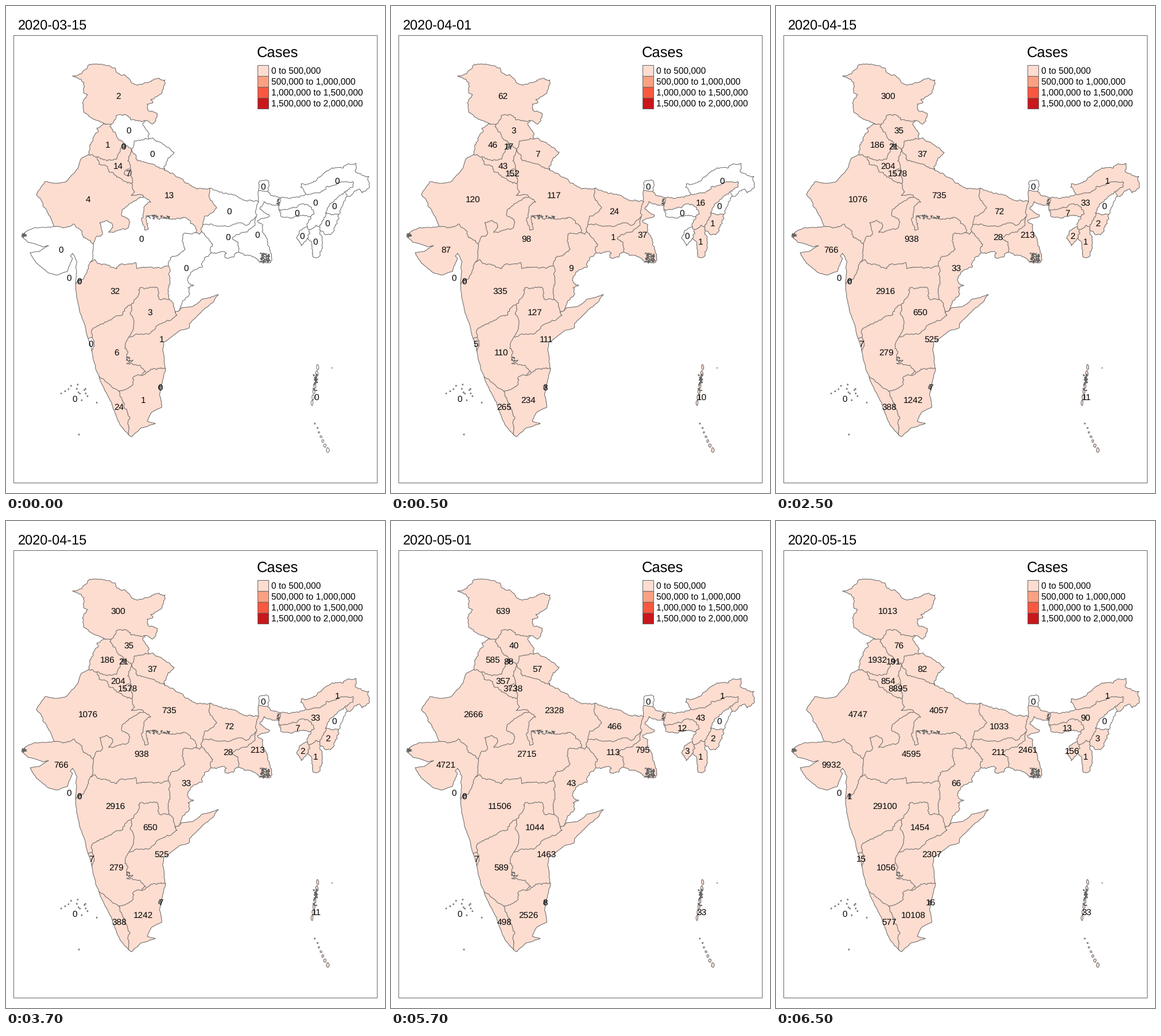
These frames come from a looping animation (660 px wide and 849 px high, 8000 ms). A matplotlib script:

```python
import numpy as np
import matplotlib.pyplot as plt
from matplotlib.animation import FuncAnimation
from matplotlib.collections import LineCollection
from matplotlib.patches import Polygon, Rectangle

W, H, DPI = 660, 849, 64
PX = 72 / DPI  # points per pixel
LINE = "#646464"
REDS = ["#fdddd0", "#fca082", "#f9583f", "#c9171c"]
DATES = ["2020-03-15", "2020-04-01", "2020-04-15", "2020-05-01", "2020-05-15"]
BIN = 500_000

plt.rcParams.update({"font.family": "Liberation Sans", "path.snap": False,
                     "text.hinting": "none"})
rng = np.random.default_rng(7)
arcs, blobs, specks, states = [], [], [], {}


def roughen(a, b, amp):
    """Split a segment by displaced midpoints until the pieces are short."""
    dx, dy = b - a
    length = np.hypot(dx, dy)
    if length < 3:
        return [a]
    shift = np.clip(rng.normal(0, amp), -2 * amp, 2 * amp) / np.sqrt(length)
    mid = (a + b) / 2 + shift * np.array([-dy, dx])
    return roughen(a, mid, amp) + roughen(mid, b, amp)


def arc(owners, *xy, amp=0.33):
    """Border through key points, shared by the named regions."""
    pts = np.array(xy, float).reshape(-1, 2)
    line = [p for a, b in zip(pts, pts[1:]) for p in roughen(a, b, amp)]
    arcs.append((owners.split(), np.array(line + [pts[-1]])))


def coast(owner, *xy):
    arc(owner, *xy, amp=0.13)


def blob(code, x, y, w, h):
    a = np.linspace(0, 2 * np.pi, 10)[:-1]
    r = rng.uniform(0.75, 1.2, 9) / 2
    blobs.append((code, np.c_[x + w * r * np.cos(a), y + h * r * np.sin(a)]))


def scribble(x, y, w, h, count):
    for c in rng.uniform((x, y), (x + w, y + h), (count, 2)):
        specks.append(c + rng.uniform(-1.7, 1.7, (6, 2)))


def state(code, x, y, *counts):
    states[code] = (x, y, counts)


def ring(code):
    """Chain all arcs of a region into one closed outline."""
    parts = [p for owners, p in arcs if code in owners]
    loop = parts.pop(0)
    while parts:
        both_ends = np.array([(p[0], p[-1]) for p in parts])
        gaps = np.linalg.norm(both_ends - loop[-1], axis=2)
        i, flip = np.unravel_index(gaps.argmin(), gaps.shape)
        part = parts.pop(i)
        loop = np.vstack([loop, part[::-1] if flip else part])
    return loop


# North
arc("JK", 174, 206, 147, 194, 139, 187, 135, 166, 142, 155, 135, 151, 136, 134,
    116, 122, 132, 118, 144, 103, 160, 101, 190, 108, 194, 117, 212, 125,
    229, 138, 260, 127, 277, 129, 272, 151, 252, 163, 256, 168, 246, 171, 250, 184,
    263, 187, 261, 200, 255, 206, 243, 200)
arc("JK HP", 243, 200, 218, 199, 205, 189, 192, 191, 183, 206)
arc("JK PB", 183, 206, 174, 206)
arc("HP PB", 183, 206, 181, 210, 195, 231, 205, 240)
arc("HP HR", 205, 240, 219, 251)
arc("HP", 243, 200, 238, 205, 246, 217, 249, 232)
arc("HP UK", 219, 251, 224, 235, 249, 232)
arc("UK", 249, 232, 256, 230, 267, 237, 293, 255, 275, 281, 277, 287)
arc("UK UP", 277, 287, 252, 275, 230, 270, 226, 259, 219, 251)
arc("PB", 174, 206, 158, 213, 160, 220, 146, 242, 144, 259)
arc("PB RJ", 144, 259, 158, 263)
arc("PB HR", 158, 263, 176, 270, 193, 267, 199, 254, 205, 240)
arc("HR RJ", 158, 263, 162, 276, 177, 280, 179, 289, 198, 300, 212, 309, 219, 309)
arc("HR UP", 219, 251, 212, 270, 217, 286, 219, 309)
arc("RJ", 144, 259, 133, 264, 125, 283, 104, 306, 90, 309, 68, 306, 53, 328,
    61, 338, 64, 348, 76, 366, 84, 384, amp=0.2)
arc("RJ UP", 219, 309, 224, 324, 218, 330, 240, 333)
arc("RJ MP", 152, 415, 156, 404, 168, 397, 163, 378, 176, 374, 186, 382, 179, 395,
    209, 389, 214, 372, 201, 364, 202, 356, 219, 343, 240, 333)
arc("RJ GJ", 84, 384, 117, 380, 130, 391, 134, 400, 152, 415)
arc("UP MP", 240, 333, 252, 342, 236, 373, 242, 391, 248, 388, 244, 366, 290, 371,
    313, 369, 330, 385, 331, 394, amp=0.4)
arc("UP", 277, 287, 313, 309, 331, 318, 356, 317)
arc("UP BR", 356, 317, 354, 327, 367, 352, 349, 366, 343, 381)
arc("UP JH", 343, 381, 341, 393)
arc("UP CG", 341, 393, 337, 398, 331, 394)

# East
arc("BR", 356, 317, 386, 327, 411, 337, 440, 341)
arc("BR WB", 440, 341, 435, 362, 436, 367)
arc("BR JH", 436, 367, 420, 382, 411, 378, 389, 384, 343, 381)
arc("JH WB", 436, 367, 431, 384, 394, 406, 404, 413, 405, 429)
arc("JH", 405, 429, 396, 438, 381, 438, 384, 431, 357, 430)
arc("JH CG", 341, 393, 360, 415, 357, 430)
arc("WB", 440, 341, 440, 322)
arc("WB SK", 440, 322, 456, 323)
arc("SK", 440, 322, 441, 306, 455, 304, 456, 323)
arc("WB", 456, 323, 460, 328, 477, 334)
arc("WB AS", 477, 334, 476, 348)
arc("WB", 476, 348, 449, 341, 442, 354, 459, 366, 438, 374, 447, 381, 446, 393,
    455, 408, 460, 428, 461, 447, 441, 447, 431, 437, 417, 435, 405, 429)

# North-east
arc("AS", 477, 334, 508, 333, 522, 328)
arc("AS AR", 522, 328, 556, 320, 560, 314, 585, 306, 604, 306, 604, 316, 590, 324)
arc("AS NL", 590, 324, 563, 346, 556, 361)
arc("AS MN", 556, 361, 546, 385)
arc("AS MZ", 546, 385, 540, 382, 528, 390)
arc("AS TR", 528, 390, 525, 385)
arc("AS", 525, 385, 530, 367)
arc("AS ML", 530, 367, 537, 362, 530, 350, 511, 346, 502, 351, 475, 355)
arc("AS", 475, 355, 476, 348)
arc("ML", 475, 355, 479, 367, 499, 370, 530, 367)
arc("TR MZ", 528, 390, 526, 404)
arc("TR", 526, 404, 514, 418, 506, 404, 512, 391, 525, 385)
arc("MZ", 526, 404, 531, 410, 535, 438, 545, 437, 550, 405, 547, 391)
arc("MZ MN", 547, 391, 546, 385)
arc("MN", 547, 391, 565, 399, 579, 372, 579, 364)
arc("MN NL", 579, 364, 556, 361)
arc("NL", 579, 364, 594, 332)
arc("NL AR", 594, 332, 590, 324)
arc("AR", 594, 332, 616, 319, 620, 326, 633, 316, 632, 297, 608, 289, 610, 275,
    596, 275, 588, 282, 568, 282, 547, 298, 532, 308, 514, 310, 513, 316, 522, 328)

# Centre and west
arc("MP CG", 331, 394, 308, 398, 312, 424, 290, 436, 283, 453)
arc("CG", 357, 430, 342, 447, 342, 455, 322, 464, 316, 476, 319, 484, 327, 487,
    317, 491, 319, 503, 307, 517, 300, 532)
arc("CG AP", 300, 532, 294, 534)
arc("CG TG", 294, 534, 284, 511)
arc("CG MH", 283, 453, 286, 484, 284, 511)
arc("MP MH", 147, 446, 155, 442, 165, 450, 193, 458, 197, 451, 226, 447, 228, 458,
    253, 455, 283, 453)
arc("MP GJ", 152, 415, 151, 431, 147, 446)
arc("GJ MH", 147, 446, 141, 464, 136, 474, 121, 485)
coast("GJ", 84, 384, 48, 387, 34, 394, 27, 401, 38, 412, 64, 420, 74, 418, 58, 428,
      42, 430, 52, 447, 74, 465, 90, 469, 107, 463, 116, 441, 112, 436, 116, 431,
      123, 444, 121, 485)

# South
coast("MH", 121, 485, 123, 508, 129, 535, 143, 580)
arc("MH GA", 143, 580, 150, 577)
arc("GA KA", 150, 577, 154, 592, 150, 602)
coast("GA", 143, 580, 150, 602)
arc("MH KA", 150, 577, 151, 563, 175, 551, 194, 540, 203, 539, 213, 522, 218, 521)
arc("MH TG", 218, 521, 229, 507, 233, 491, 262, 490, 267, 511, 284, 511)
arc("KA TG", 218, 521, 220, 567, 214, 577)
arc("TG AP", 214, 577, 250, 571, 262, 558, 283, 549, 298, 539, 294, 534)
coast("AP", 300, 532, 306, 526, 325, 524, 341, 511, 370, 503, 360, 517, 320, 553,
      319, 561, 302, 566, 288, 577, 275, 586, 273, 600, 278, 633)
arc("KA AP", 214, 577, 207, 597, 210, 615, 221, 617, 210, 623, 233, 626, 243, 637,
    236, 644, amp=0.4)
arc("AP TN", 236, 644, 257, 632, 278, 633)
arc("KA TN", 236, 644, 221, 648, 220, 661, 196, 671)
arc("KA KL", 162, 646, 196, 671)
coast("KA", 150, 602, 162, 646)
coast("KL", 162, 646, 181, 687, 199, 731, 214, 748)
arc("KL TN", 196, 671, 206, 700, 215, 716, 214, 748)
coast("TN", 278, 633, 268, 675, 271, 700, 255, 707, 246, 724, 260, 728, 236, 735,
      219, 751, 214, 748)

# Small territories, then island chains from north to south
for code, x, y, size in [("DL", 212, 291, 13), ("CH", 205, 244, 6),
                         ("DN", 128, 480, 6), ("PY", 268, 665, 5)]:
    blob(code, x, y, size, size)
for t in np.linspace(0, 1, 7):
    blob("AN", 543 - 10 * t, 630 + 62 * t, 4, 10)
    blob("AN", 538 + 21 * t + rng.normal(), 728 + 46 * t, 2 + 3 * t, 2 + 6 * t ** 2)
blob("AN", 568, 631, 1, 1)
for x, y in [*rng.normal((122, 676), (17, 12), (14, 2)), (127, 747)]:
    blob("LD", x, y, 2, 2)

# Ragged delta, creeks and enclaves
scribble(443, 431, 16, 16, 48)
scribble(28, 397, 8, 6, 16)
scribble(472, 337, 5, 10, 8)
scribble(246, 365, 44, 6, 18)
scribble(210, 612, 6, 7, 4)
scribble(536, 642, 6, 30, 22)
scribble(204, 242, 3, 5, 5)
scribble(126, 477, 4, 6, 6)
scribble(267, 662, 2, 6, 6)

# Label position and reported count on each date
state("JK", 195, 157, 2, 62, 300, 639, 1013)
state("HP", 214, 217, 0, 3, 35, 40, 76)
state("PB", 177, 242, 1, 46, 186, 585, 1932)
state("CH", 205, 245, 0, 17, 21, 88, 191)
state("UK", 255, 258, 0, 7, 37, 57, 82)
state("HR", 195, 279, 14, 43, 204, 357, 854)
state("DL", 212, 292, 7, 152, 1578, 3738, 8895)
state("RJ", 143, 337, 4, 120, 1076, 2666, 4747)
state("UP", 284, 330, 13, 117, 735, 2328, 4057)
state("BR", 389, 358, 0, 24, 72, 466, 1033)
state("SK", 448, 315, 0, 0, 0, 0, 0)
state("AR", 577, 305, 0, 0, 1, 1, 1)
state("AS", 539, 343, 0, 16, 33, 43, 90)
state("NL", 572, 349, 0, 0, 0, 0, 0)
state("MN", 560, 379, 0, 1, 2, 2, 3)
state("MZ", 539, 411, 0, 1, 1, 1, 1)
state("TR", 516, 401, 0, 0, 2, 3, 156)
state("ML", 507, 361, 0, 0, 7, 12, 13)
state("WB", 438, 399, 0, 37, 213, 795, 2461)
state("JH", 387, 403, 0, 1, 28, 113, 211)
state("CG", 314, 457, 0, 9, 33, 43, 66)
state("MP", 236, 406, 0, 98, 938, 2715, 4595)
state("GJ", 96, 425, 0, 87, 766, 4721, 9932)
state("DD", 110, 474, 0, 0, 0, 0, 0)
state("DN", 128, 480, 0, 0, 0, 0, 1)
state("MH", 190, 497, 32, 335, 2916, 11506, 29100)
state("TG", 251, 534, 3, 127, 650, 1044, 1454)
state("AP", 271, 581, 1, 111, 525, 1463, 2307)
state("KA", 192, 604, 6, 110, 279, 589, 1056)
state("GA", 148, 589, 0, 5, 7, 7, 15)
state("LD", 120, 685, 0, 0, 0, 0, 0)
state("KL", 197, 699, 24, 265, 388, 498, 577)
state("TN", 239, 687, 1, 234, 1242, 2526, 10108)
state("PY", 269, 665, 0, 3, 7, 8, 16)
state("AN", 541, 682, 0, 10, 11, 33, 33)

fig = plt.figure(figsize=(W / DPI, H / DPI), dpi=DPI, facecolor="white")
ax = fig.add_axes([0, 0, 1, 1])
ax.set(xlim=(0, W), ylim=(H, 0))
ax.axis("off")


def write(x, baseline, s, size, ha="left"):
    return ax.text(x, baseline, s, fontsize=size * PX, ha=ha, va="baseline", zorder=5)


fills = []
for code in {c: None for owners, _ in arcs for c in owners}:
    fills.append((code, ax.add_patch(Polygon(ring(code), lw=0, zorder=1))))
for code, pts in blobs:
    fills.append((code, ax.add_patch(Polygon(pts, ec=LINE, lw=PX, zorder=3))))
ax.add_collection(LineCollection([p for _, p in arcs] + specks, colors=LINE,
                                 linewidths=PX, zorder=4))

ax.add_patch(Rectangle((13.5, 51.5), 633, 780, fill=False, ec=LINE, lw=PX))
write(437, 89, "Cases", 25.5)
for i, color in enumerate(REDS):
    top = 103.5 + 19 * i
    ax.add_patch(Rectangle((438.5, top), 19, 19, fc=color, ec=LINE, lw=PX))
    write(462, top + 14.5, f"{i * BIN:,} to {(i + 1) * BIN:,}", 15.5)

title = write(21, 42, "", 23.5)
labels = {c: write(x, y + 5, "", 15.4, "center") for c, (x, y, _) in states.items()}


def update(frame):
    # the first date shows for one tick, each later one for four
    step = (frame + 3) // 4
    title.set_text(DATES[step])
    for code, label in labels.items():
        label.set_text(str(states[code][2][step]))
    for code, patch in fills:
        count = states[code][2][step]
        patch.set_facecolor(REDS[count // BIN] if count else "white")
    return [title, *labels.values(), *(p for _, p in fills)]


anim = FuncAnimation(fig, update, frames=16, interval=500, repeat=True, blit=False)
plt.show()
```
